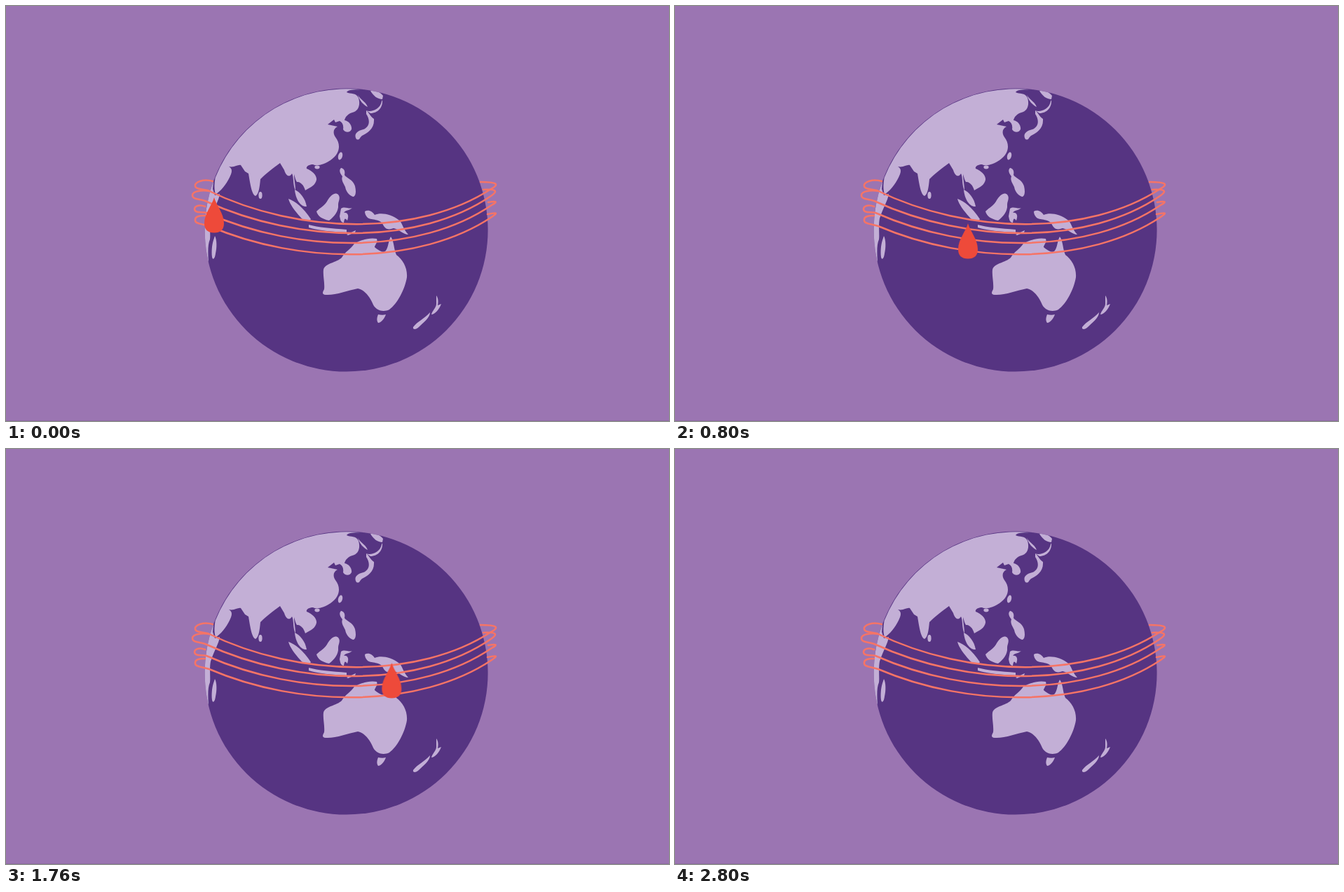
Write an HTML page that moves like this. It is 946 by 592 pixels and loops after 5.36 s.

```html
<!DOCTYPE html>
<html lang="en">
<head>
<meta charset="utf-8">
<title>Globe with a travelling drop</title>
<style>
html, body { margin: 0; width: 100%; height: 100%; overflow: hidden; background: #9b75b2; }
svg { position: absolute; left: 0; top: 0; display: block; }
.land { fill: #c3afd6; }
.rings { fill: none; stroke: #f67466; stroke-width: 2.5; stroke-linecap: round; }
.drop {
  fill: #ee4a3a;
  transform-origin: 50% 0;
  offset-anchor: 50% 0;
  offset-rotate: 0deg;
  offset-path: path("M297 273C318 286.6 339 296.5 360 302C379 307 399 308.5 418 310C445 312.2 473 313.5 500 312C517 310.6 533 307.8 550 305C571 301.5 593 298 614 293C639 287 663 277 688 266");
  animation: glide 5360ms infinite;
}
/* moves every 80 ms, then rests hidden until the loop ends */
@keyframes glide {
  0% { offset-distance: 0px; opacity: 1; animation-timing-function: steps(5); }
  7.462% { offset-distance: 69.6px; animation-timing-function: steps(5); }
  14.925% { offset-distance: 128.3px; animation-timing-function: steps(8); }
  26.865% { offset-distance: 210.6px; animation-timing-function: steps(4); }
  32.835% { offset-distance: 261.2px; animation-timing-function: steps(5); }
  40.298% { offset-distance: 326.4px; animation-timing-function: steps(7); }
  50.746% { offset-distance: 405.2px; opacity: 1; animation-timing-function: step-end; }
  52.238%, 100% { offset-distance: 405.2px; opacity: 0; }
}
</style>
</head>
<body>
<svg width="946" height="592" viewBox="0 0 946 592">
  <defs><clipPath id="globe"><circle cx="485.6" cy="319.6" r="202"/></clipPath></defs>
  <rect y="591" width="946" height="1" fill="#8d6ba3"/>
  <circle cx="485.6" cy="319.6" r="202" fill="#563482"/>
  <g class="land" clip-path="url(#globe)">
    <!-- Asia -->
    <path d="M298.6 245A201.3 201.3 0 0 1 510 119.7C500 119 488 119 486 123C492 126 499 123 503 131C506 141 503 150 494 152C488 154 484 158 483 163C489 164 494 170 493 176C490 182 483 180 481 176C482 170 480 166 476 164L470 166L468 162L459 169L473 172C467 175 466 181 470 187C478 197 477 211 463 220C454 226 444 229 438 226C432 226 428 229 429 232C437 235 444 242 443 248C441 257 433 259 427 263C425 256 420 250 415 251C413 248 412 243 411 240C411 248 413 255 413 263C409 256 411 244 408 239C404 246 399 241 397 234L391 224C380 232 372 238 363 247C362 257 361 268 356 271C350 269 348 250 346 239L341 236L335 227C330 226 326 231 318 229C322 231 323 235 321 240C317 250 310 261 299 269C297 262 297 254 298.6 245Z"/>
    <!-- Africa, Madagascar -->
    <path d="M296 250L295 261L298 270L305 268C304 277 296 290 292 303C290 314 292 325 291 333C288 340 288 350 289 365L280 350L280 280Z"/>
    <path d="M298 328C301 333 301 345 299 353C298 361 295 363 294 358C293 350 294 340 296 334Z"/>
    <!-- Small islands -->
    <ellipse cx="363" cy="270" rx="2.6" ry="5"/>
    <ellipse cx="444" cy="230" rx="3.6" ry="2.4"/>
    <ellipse cx="477" cy="214" rx="3" ry="5.6" transform="rotate(15 477 214)"/>
    <!-- Japan, Sakhalin -->
    <path d="M520 121C528 120 534 123 538 128L537 133C530 133 524 128 520 121Z"/>
    <path d="M537 134C538 144 531 153 520 153L514 149C520 152 534 148 536 136Z"/>
    <path d="M502 127C506 134 514 137 516 144C511 142 505 136 502 127Z"/>
    <path d="M514 149C518 152 520 158 525 161C526 175 516 181 508 185C504 188 505 192 500 190C496 184 500 178 510 176C519 172 520 163 514 154Z"/>
    <!-- Philippines -->
    <path d="M478 231C483 232 484 236 483 241C486 246 495 247 498 257C500 265 499 272 495 272C489 270 485 264 484 258C481 252 478 248 480 243C476 238 475 234 478 231Z"/>
    <!-- Malaya, Sumatra, Java, Timor -->
    <path d="M412 262C419 265 427 274 429 286C420 287 413 275 412 262Z"/>
    <path d="M403 275C412 278 424 287 435 304C432 309 424 306 420 301C412 292 405 283 403 275Z"/>
    <path d="M432 312C445 316 465 317 486 319L486 323C465 322 445 320 432 316Z"/>
    <path d="M486 326L499 320L498 323L488 327Z"/>
    <!-- Borneo, Sulawesi -->
    <path d="M443 293C449 287 455 285 459 277C464 269 470 265 474 269C478 274 474 278 474 284C475 292 468 301 461 306C451 304 445 300 443 293Z"/>
    <path d="M478 289C483 285 489 290 494 288C490 292 484 291 482 295C487 294 490 298 487 306C483 301 483 304 482 309C477 309 477 303 476 300Z"/>
    <!-- New Guinea -->
    <path d="M512 293C517 290 523 293 526 298C535 294 550 297 560 305C566 309 565 316 574 326C567 326 560 318 553 317C545 320 541 318 538 312C534 303 522 306 516 302C513 299 512 296 512 293Z"/>
    <!-- Australia, Tasmania -->
    <path d="M453 376C455 367 472 366 479 359C484 350 492 347 497 339C508 333 520 330 529 332C531 337 526 341 526 344C532 349 537 352 541 350C546 345 545 336 549 329C554 336 553 346 557 355C566 362 573 373 572 387C569 405 558 425 547 433C537 438 526 433 523 424C519 414 510 404 502 403C487 406 470 413 456 412C450 411 452 408 454 404C455 395 452 385 453 376Z"/>
    <path d="M531 440C535 441 539 441 542 440C540 446 535 452 531 452C528 448 530 443 531 440Z"/>
    <!-- New Zealand -->
    <path d="M614 413C617 417 617 422 616 427L621 425C618 433 612 440 607 440C608 435 614 430 614 425Z"/>
    <path d="M605 437C605 445 595 452 589 458C585 462 580 462 581 458C587 450 597 446 605 437Z"/>
  </g>
  <g class="rings">
    <path d="M295 250C282 246 269 251 270 257C271 262 281 261 288 263C420 327.5 590 327.5 692 261C705 254 700 251 677 251"/>
    <path d="M290 264C280 262 266 264 266 270C266 276 275 275 284 278C420 340.5 590 340.5 692 271C702 264 700 261 681 262"/>
    <path d="M284 286C276 283 269 285 269 290C270 296 279 293 286 295C420 354.2 590 354.2 693 284C702 279 700 278 688 280"/>
    <path d="M284 299C276 299 269 300 270 306C270 311 281 311 290 314C420 369.7 590 369.7 693 301C702 295 701 294 687 297"/>
  </g>
</svg>
<svg class="drop" width="28" height="51" viewBox="-14 0 28 51">
  <path d="M0 0C3 11 14 23 14 37C14 46 9 50.5 0 50.5C-9 50.5 -14 46 -14 37C-14 23 -3 11 0 0Z"/>
</svg>
</body>
</html>
```
